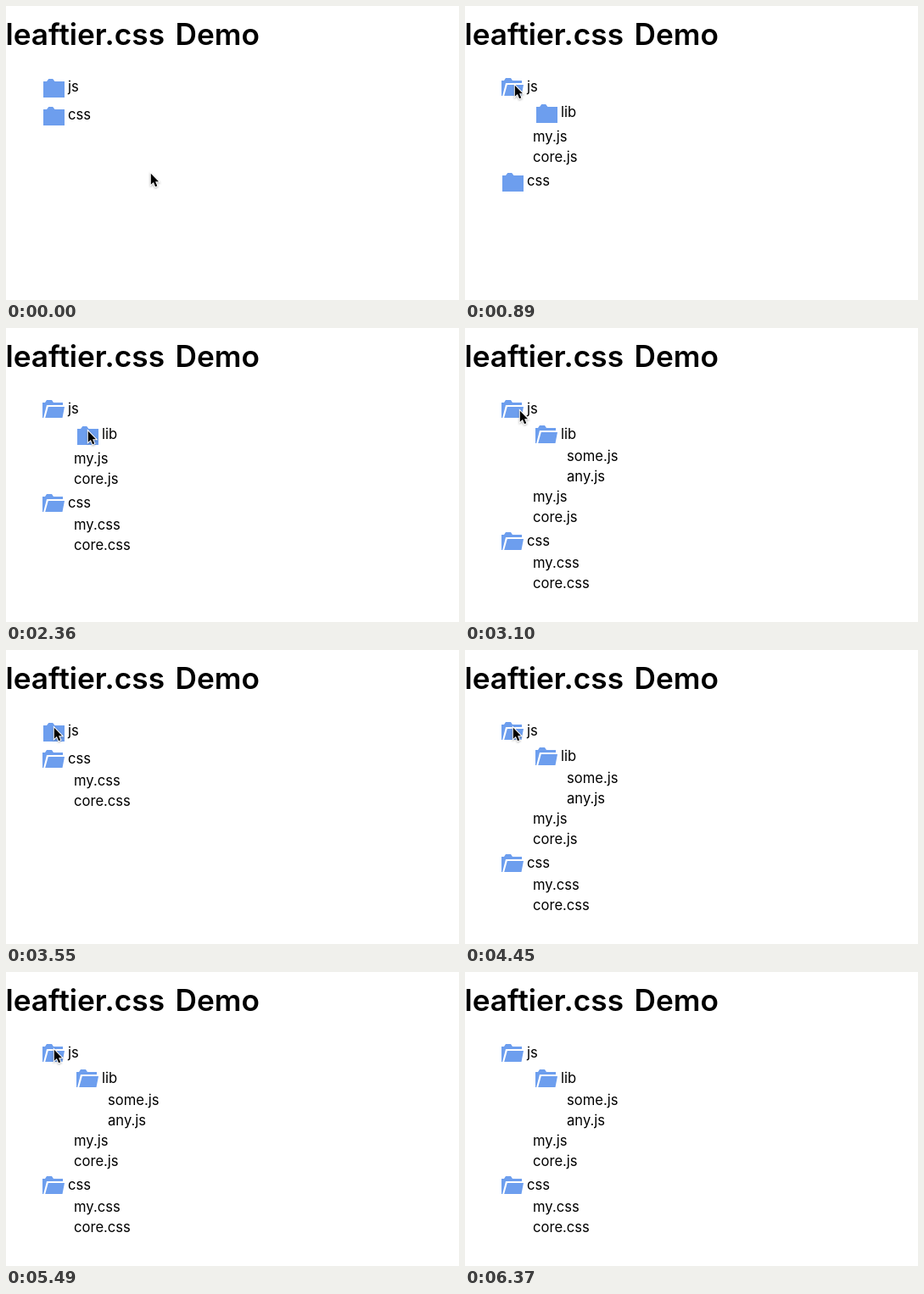
Recreate the animation shown at these times as an HTML page. Size 534 by 347 pixels, loop 7270 ms.

```html
<!DOCTYPE html>
<html lang="en">
<head>
<meta charset="utf-8">
<title>Tree demo</title>
<style>
  html, body { margin: 0; width: 100%; height: 100%; overflow: hidden; background: #fff; }
  svg { display: block; width: 534px; height: 347px; }
  text { font: 400 16.6px Inter, "Liberation Sans", sans-serif; fill: #000; }
  .title { font-size: 35.2px; font-weight: 600; }
  .folder { fill: #6d9eee; }
  .cursor { filter: drop-shadow(0 1px 1px rgba(0, 0, 0, .3)); }
</style>
</head>
<body>
<svg viewBox="0 0 534 347">
  <text class="title" x="-.5" y="45.7">leaftier.css <tspan x="199.5">Demo</tspan></text>
  <g id="tree"></g>
  <path id="cursor" class="cursor" stroke="#fff" stroke-width="2" paint-order="stroke"
    d="M.8 .8V13.8L3.9 11L6.1 16.2L8.3 15.2L6.1 10.2H10Z"/>
</svg>
<script>
const LOOP = 7270;
const STEP = 145;   // the pointer is redrawn once per step
const START = 101;  // baseline of the first row
const CLOSED = 'M1 -12H5L7.3 -15H12.2L14.5 -12H26V7H1Z';
const OPEN = 'M0 -13H3L5 -16H11L13 -13H24V-10H5L1.2 5H0Z M6.8 -8H26L23.5 5H3.2Z';

const file = name => ({ name });
const folder = (name, clicks, kids) => ({ name, clicks, kids });

// Folders start closed and flip at each click time.
const roots = [
  folder('js', [890, 3550, 4450, 5040, 5490], [
    folder('lib', [2660], [file('some.js'), file('any.js')]),
    file('my.js'),
    file('core.js')
  ]),
  folder('css', [1910], [file('my.css'), file('core.css')])
];

const home = { x: 170, y: 197 };
const glides = [
  { at: 0, steps: 5, x: 58, y: 93 },
  { at: 885, steps: 5, x: 54, y: 206 },
  { at: 1910, steps: 3, x: 96, y: 121 },
  { at: 2805, steps: 4, x: 56, y: 91 },
  { at: 5640, steps: 5, x: 363, y: 352 }
];

const cursor = document.getElementById('cursor');
const tree = document.getElementById('tree');
const easeOut = p => 1 - (1 - p) ** 2.3;
const lerp = (a, b, p) => a + (b - a) * p;

function add(tag, attrs, parent) {
  const el = document.createElementNS('http://www.w3.org/2000/svg', tag);
  for (const key in attrs) el.setAttribute(key, attrs[key]);
  return parent.appendChild(el);
}

function build(node, depth) {
  const left = 40 * depth;
  node.row = add('g', {}, tree);
  if (node.kids) {
    node.icon = add('path', { class: 'folder', transform: `translate(${43 + left})` }, node.row);
    node.kids.forEach(kid => build(kid, depth + 1));
  }
  add('text', { x: left + (node.kids ? 73 : 40) }, node.row).textContent = node.name;
}

function hide(node) {
  node.row.setAttribute('display', 'none');
  (node.kids || []).forEach(hide);
}

// Places a node at baseline y and returns the baseline for the next row.
function place(node, y, t) {
  if (node.kids && y > START) y += 4;
  node.row.setAttribute('display', 'inline');
  node.row.setAttribute('transform', `translate(0 ${y})`);
  if (!node.kids) return y + 24;

  const open = node.clicks.filter(at => at <= t).length % 2 === 1;
  node.icon.setAttribute('d', open ? OPEN : CLOSED);
  if (open) return node.kids.reduce((next, kid) => place(kid, next, t), y + 26);
  node.kids.forEach(hide);
  return y + 29;
}

function pointer(t) {
  return glides.filter(g => g.at <= t).reduce((from, g) => {
    const p = easeOut(Math.min(1, Math.floor((t - g.at) / STEP) / g.steps));
    return { x: lerp(from.x, g.x, p), y: lerp(from.y, g.y, p) };
  }, home);
}

function draw(t) {
  roots.reduce((y, node) => place(node, y, t), START);
  const { x, y } = pointer(t);
  cursor.setAttribute('transform', `translate(${Math.round(x)} ${Math.round(y)})`);
}

const begin = performance.now();
function tick() {
  draw((performance.now() - begin) % LOOP);
  requestAnimationFrame(tick);
}

roots.forEach(node => build(node, 0));
tick();
</script>
</body>
</html>
```
